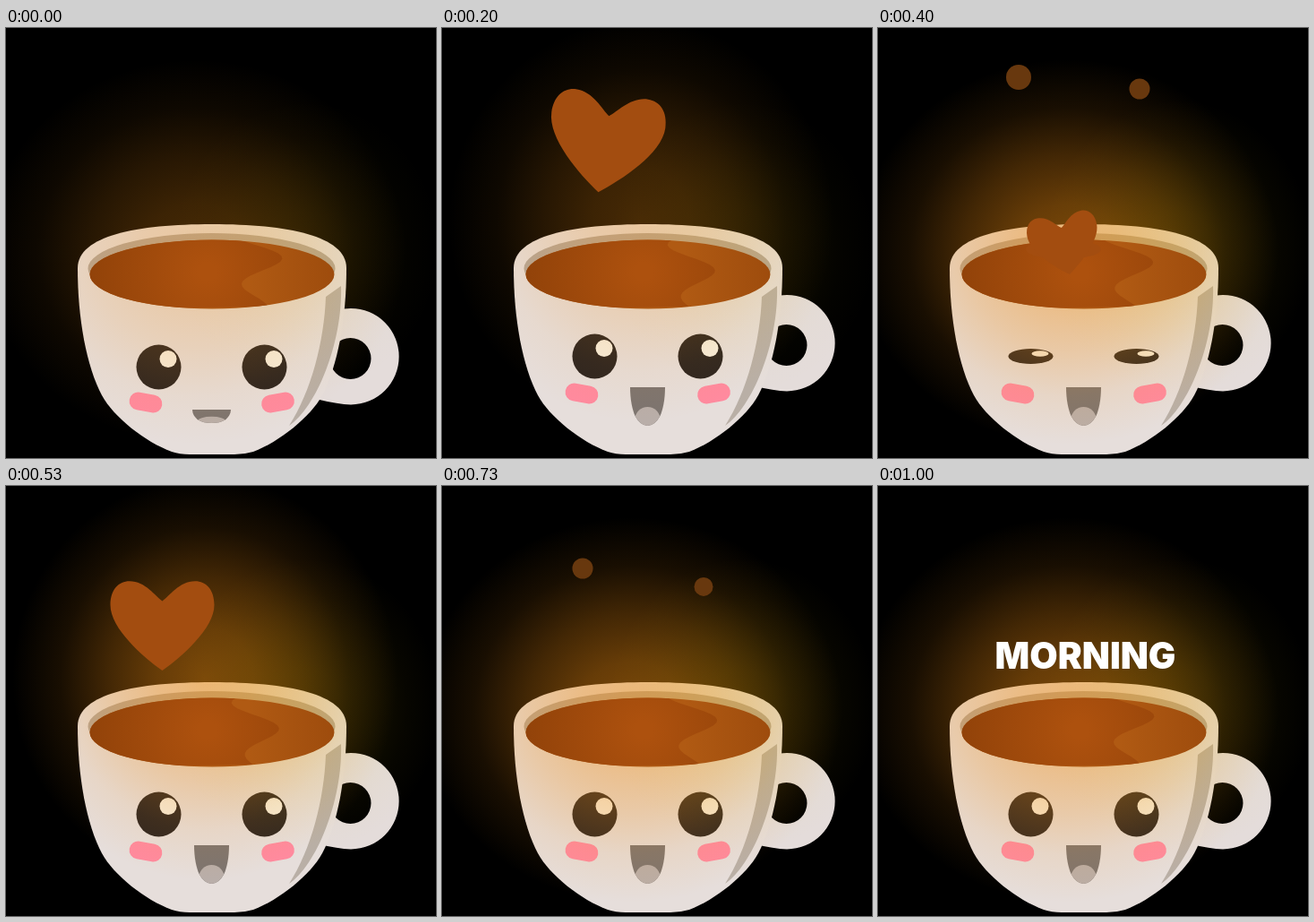
Recreate the animation shown at these times as an HTML page with a canvas. Size 480x480 px, loop 1.07 s.

```html
<!DOCTYPE html>
<html lang="en">
<head>
<meta charset="utf-8">
<title>Morning cup</title>
<style>
  html, body { margin: 0; width: 100%; height: 100%; overflow: hidden; background: #000; }
  canvas { display: block; }
</style>
</head>
<body>
<canvas id="stage" width="480" height="480"></canvas>
<script>
const ctx = document.getElementById('stage').getContext('2d');
const LOOP = 1070, STEPS = 16;

const BODY = new Path2D('M80 268C80 232 146 219 230 219S380 232 380 268C380 325 370 378 353 410C340 434 305 462 276 473Q266 476 255 476H205Q194 476 185 473C155 462 120 434 107 410C90 378 80 325 80 268Z');
const SHADE = new Path2D('M374 288L357 300C355 350 341 405 316 444C346 424 376 352 374 288Z');
const HANDLE = new Path2D('M350 306Q370 298 385 298A53.7 53.7 0 0 1 385 405.4Q370 405 350 400ZM361.5 354a23 23 0 0 0 46 0a23 23 0 0 0 -46 0Z');
const MOUTH = new Path2D('M-19.5 0H19.5C19.5 14 17 25 14 32Q8 43 0 43T-14 32C-17 25 -19.5 14 -19.5 0Z');
const HEART = new Path2D('M0 0C-25 -18 -68 -55 -68 -86C-68 -106 -57 -117 -43 -117C-22 -117 -9 -97 0 -91C9 -97 22 -117 43 -117C57 -117 68 -106 68 -86C68 -55 25 -18 0 0Z');

const RISE = 4; // steps from surfacing to bursting
const HEARTS = [{ start: 1, lift: 149, sway: 11 }, { start: 6, lift: 112, sway: 3 }];

function placed(x, y, draw, { sx = 1, sy = sx, turn = 0 } = {}) {
  ctx.save();
  ctx.translate(x, y);
  ctx.rotate(turn * Math.PI / 180);
  ctx.scale(sx, sy);
  draw();
  ctx.restore();
}
function ellipse(x, y, rx, ry, color) {
  ctx.beginPath();
  ctx.ellipse(x, y, rx, ry, 0, 0, 7);
  ctx.fillStyle = color;
  ctx.fill();
}
function fill(path, color, rule) {
  ctx.fillStyle = color;
  ctx.fill(path, rule);
}
function shaded(gradient, ...stops) {
  stops.forEach((c, n) => gradient.addColorStop(n / (stops.length - 1), c));
  return gradient;
}

function drawCup(down) {
  placed(0, 15 * down, () => fill(HANDLE, '#e4dcda', 'evenodd'));
  fill(BODY, '#e6dedb');
  fill(SHADE, '#b9afa6');
  ellipse(229.5, 268.5, 138, 39.5, '#b3a69a');
}

function drawFace(down, lid) {
  for (const x of [170.5, 288.5])
    placed(x, 366.5 + 12 * down, () => {
      ellipse(0, 0, 25, 25, '#2a2320');
      ellipse(10.5, -9, 9.5, 9.5, '#f6eedf');
    }, { sx: 1, sy: lid });

  for (const side of [-1, 1])
    placed(229.75 + 73.75 * side, 408 + 10 * down, () => {
      ctx.beginPath();
      ctx.roundRect(-18.5, -10, 37, 20, 10);
      ctx.fillStyle = '#ff8a9f';
      ctx.fill();
    }, { turn: -10 * side });

  placed(229.5, 401 + 25 * down, () => {
    fill(MOUTH, '#7c7470');
    ctx.clip(MOUTH);
    ellipse(0, 36, 14, 14, '#b9aea9');
  }, { sx: 1 + .1 * down, sy: 1 - .65 * down });
}

// Light of one colour fading out from a centre
function drawLight(x, y, rx, ry, rgb, alpha) {
  const falloff = [1, .85, .55, .2, 0].map(k => `rgba(${rgb},${alpha * k})`);
  placed(x, y, () => {
    ctx.fillStyle = shaded(ctx.createRadialGradient(0, 0, 0, 0, 0, 1), ...falloff);
    ctx.fillRect(-1, -1, 2, 2);
  }, { sx: rx, sy: ry });
}

// The glow stretches upwards with a rising heart and is stronger from the second one on
function drawGlow(step) {
  const heart = HEARTS.find(h => step >= h.start && step <= h.start + RISE);
  const rise = heart ? (step - heart.start) / RISE : 0;
  const alpha = step < HEARTS[1].start ? .29 : .5;
  drawLight(212 + 20 * rise, 250 - 70 * rise, 235 - 40 * rise, 215 + 20 * rise, '242,142,18', alpha);
  drawLight(335, 245, 150, 165, '215,180,0', alpha * .3);
}

function drawCoffee(step) {
  ctx.save();
  ellipse(230, 275, 136.5, 38.5,
    shaded(ctx.createLinearGradient(270, 0, 366, 0), '#b05a13', '#9e4c0d'));
  ctx.clip();
  // A wave runs down the edge of the darker part
  const peak = .28 + .06 * (step % 5);
  ctx.beginPath();
  ctx.moveTo(90, 236);
  for (let v = 0; v <= 1; v += .04)
    ctx.lineTo(282 + (32 - 20 * v) * Math.cos(2 * Math.PI * (v - peak) / .75), 236 + 78 * v);
  ctx.lineTo(90, 314);
  ctx.fillStyle = shaded(ctx.createRadialGradient(225, 272, 10, 225, 272, 135), '#ad510e', '#914209');
  ctx.fill();
  ctx.restore();
}

function drawHeart({ lift, sway }, age) {
  const u = age / RISE, swing = Math.sin(Math.PI * u);
  if (!age) ellipse(207, 247, 42, 11, '#a34d10');
  placed(214 + 11 * u - 45 * swing, 275 - lift * u ** .7, () => fill(HEART, '#a34d10'), {
    sx: .58 + .0029 * lift * u ** .25,
    turn: -10 + 14 * u + sway * swing
  });
}

// A burst heart leaves two drops that fall and shrink; a lower burst has smaller drops
function drawDrops({ lift }, age) {
  const gap = HEARTS[0].lift - lift, fall = 24 * age, size = 1 - .55 * age;
  const drop = (x, y, r) => ellipse(x, y + fall, r * size, r * size, '#68380e');
  drop(157, 55 + gap, 14 - gap / 15);
  drop(292, 68 + 1.2 * gap, 11.5 - gap / 37);
}

function drawWord() {
  ctx.font = '900 40.5px Inter, sans-serif';
  ctx.textAlign = 'center';
  ctx.fillStyle = '#fff';
  ctx.fillText('MORNING', 231.5, 204);
}

function draw(now) {
  const step = Math.min(STEPS - 1, Math.floor((now % LOOP + 8) * STEPS / LOOP));
  const down = Math.max(0, 1 - .6 * step);
  const lid = Math.abs(step - 6.5) < 1 ? .34 : 1;
  ctx.fillStyle = '#000';
  ctx.fillRect(0, 0, 480, 480);
  drawCup(down);
  drawFace(down, lid);
  drawGlow(step);
  drawCoffee(step);
  for (const heart of HEARTS) {
    const age = step - heart.start;
    if (age >= 0 && age <= RISE) drawHeart(heart, age);
    else if (age > RISE && age <= RISE + 2) drawDrops(heart, age - RISE - 1);
  }
  if (step >= 13) drawWord();
}

const start = performance.now();
function tick() {
  draw(performance.now() - start);
  requestAnimationFrame(tick);
}
tick();
</script>
</body>
</html>
```
